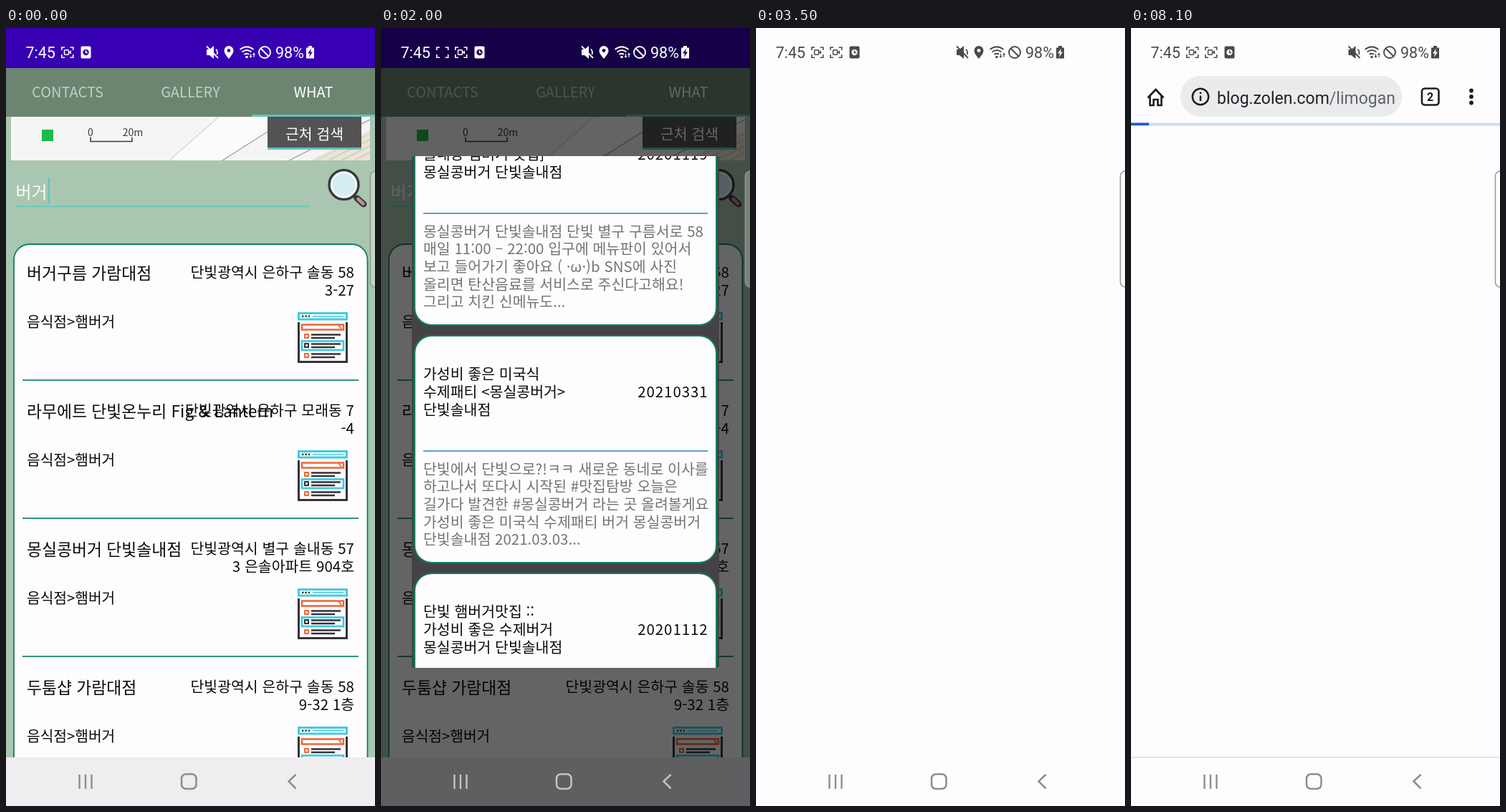
Write an HTML page that moves like this. It is 515x1087 px and loops after 8.6 s.

```html
<!DOCTYPE html>
<html lang="ko">
<head>
<meta charset="utf-8">
<title>Burger search</title>
<style>
  html, body { margin: 0; width: 100%; height: 100%; overflow: hidden; background: #fefcfe; }
  svg { display: block; width: 100vw; height: 100vh; }
  text { font-family: "Noto Sans CJK KR", "Noto Sans CJK", "Noto Sans", sans-serif; }
  .sys { font-family: Roboto, "Noto Sans", sans-serif; }
  .bold { font-weight: 700; }
  .end { text-anchor: end; }
  .mid { text-anchor: middle; }
  .date { text-anchor: end; letter-spacing: .9px; }
</style>
</head>
<body>
<svg id="stage" viewBox="0 0 515 1087" preserveAspectRatio="none"></svg>
<script>
const LOOP = 8600, STEP = 100;
const PAPER = '#fefcfe', GREEN = '#11805f', TEAL = '#62c4bc';

// y is the vertical middle of the line
const text = (x, y, str, size, fill = '#0c0a0c', cls = '') =>
  `<text x="${x}" y="${(y + size * .37).toFixed(2)}" font-size="${size}" fill="${fill}" class="${cls}">${str}</text>`;
const rect = (x, y, w, h, fill, more = '') =>
  `<rect x="${x}" y="${y}" width="${w}" height="${h}" fill="${fill}" ${more}/>`;
const line = (d, stroke, width = 2, more = '') =>
  `<path d="${d}" fill="none" stroke="${stroke}" stroke-width="${width}" ${more}/>`;
const group = (id, body, more = '') => `<g id="${id}" ${more}>${body}</g>`;

const SHOP = '몽실콩버거', BRANCH = '단빛솔내점';

const shops = [
  ['버거구름 가람대점', '단빛광역시 은하구 솔동 58', '3-27'],
  ['라무에트 단빛온누리 Fig &amp; Lantern', '단빛광역시 은하구 모래동 7', '-4'],
  [`${SHOP} ${BRANCH}`, '단빛광역시 별구 솔내동 57', '3 은솔아파트 904호'],
  ['두툼샵 가람대점', '단빛광역시 은하구 솔동 58', '9-32 1층']
];

const posts = [
  {
    title: ['[단빛 나들이 /', '솔내동 햄버거 맛집]', `${SHOP} ${BRANCH}`],
    date: '20201119',
    body: [`${SHOP} ${BRANCH} 단빛 별구 구름서로 58`, '매일 11:00 – 22:00 입구에 메뉴판이 있어서',
      '보고 들어가기 좋아요 ( ·ω·)b SNS에 사진', '올리면 탄산음료를 서비스로 주신다고해요!', '그리고 치킨 신메뉴도...']
  },
  {
    title: ['가성비 좋은 미국식', `수제패티 &lt;${SHOP}&gt;`, BRANCH],
    date: '20210331',
    body: ['단빛에서 단빛으로?!ㅋㅋ 새로운 동네로 이사를', '하고나서 또다시 시작된 #맛집탐방 오늘은',
      `길가다 발견한 #${SHOP} 라는 곳 올려볼게요`, `가성비 좋은 미국식 수제패티 버거 ${SHOP}`, `${BRANCH} 2021.03.03...`]
  },
  {
    title: ['단빛 햄버거맛집 ::', '가성비 좋은 수제버거', `${SHOP} ${BRANCH}`],
    date: '20201112',
    body: []
  }
];

function pageIcon(x, y) {
  const dark = '#353338', cyan = '#43cbe0', orange = '#ee6a3c';
  const strip = (top, bullet) => rect(10, top, 5, 5, 'none', `stroke="${bullet}" stroke-width="2"`) +
    line(`M19 ${top + .5}H60M19 ${top + 5}H52`, dark, 2.4);
  return `<g transform="translate(${x} ${y})">` +
    line('M1.5 14V69.5H68.5V14', dark, 3) +
    rect(1.5, 1.5, 67, 8.5, PAPER, `stroke="${cyan}" stroke-width="3"`) +
    line('M6 5.8H17', dark, 2.4, 'stroke-dasharray="2.4 2"') + line('M21 5.8H64', cyan, 1.6) +
    rect(6, 17.5, 58, 7, 'none', `stroke="${orange}" stroke-width="2.6"`) + line('M57 18L61 23', orange, 2) +
    strip(31, orange) +
    rect(6, 40.5, 58, 12.5, 'none', `stroke="${cyan}" stroke-width="2.8"`) + strip(44, dark) +
    strip(58, orange) + '</g>';
}

function shopRow([name, addr, rest], i) {
  const y = i * 193;
  return text(29, 343 + y, name, 22.8) +
    text(486, 341 + y, addr, 20.5, '#0c0a0c', 'end') + text(486, 366 + y, rest, 20.5, '#0c0a0c', 'end') +
    text(29, 410 + y, '음식점&gt;햄버거', 20.3) + pageIcon(407, 397 + y) +
    line(`M23 ${492 + y}H492`, '#2f9478', 1.8);
}

function postCard({ title, date, body }, i) {
  return `<g transform="translate(0 ${181 + i * 332})">` +
    rect(47, 1, 421, 317, PAPER, `rx="24" stroke="${GREEN}" stroke-width="2"`) +
    title.map((s, k) => text(59, 54.5 + k * 24.8, s, 20.5)).join('') +
    text(456.5, 79.5, date, 20.5, '#0c0a0c', 'date') +
    line('M59 162H456', '#5b9fc8', 1.8) +
    body.map((s, k) => text(59, 187 + k * 24.7, s, 20.5, '#757375')).join('') + '</g>';
}

const mapPanel = `<g clip-path="url(#mapBox)">` +
  rect(7, 124, 501, 61, '#f6f5f6') +
  '<path d="M228 185L297 124H400L308 180L300 185Z" fill="#fcfbfc"/>' +
  '<path d="M425 185L508 143V185Z" fill="#e9e5d6"/>' +
  line('M228 185L297 124M432 185L508 147', '#d2d0d0', 1.2) +
  line('M302 185L398 124M395 185L508 128', '#9c9a9c', 1.2) +
  line('M450 185L508 156M468 185L508 165M486 185L508 174', '#cfc9b4', 1.4) + '</g>' +
  rect(50, 142, 16, 16, '#1fb84a') +
  text(118, 146, '0', 14, '#3a383a', 'mid') + text(177, 146, '20m', 14, '#3a383a', 'mid') +
  line('M118 152.5V158.5H176V152.5', '#3a383a', 1.6) +
  rect(365, 124, 131, 46, '#555256') + rect(365, 167, 131, 3, TEAL) +
  text(430.5, 148, '근처 검색', 20.5, '#fff', 'mid');

const magnifier = line('M485 234L491 239', '#3a393d', 5) +
  line('M490 238L499 246', '#3a393d', 9, 'stroke-linecap="round"') +
  line('M491.5 239L498.5 245.5', '#c98f8a', 4.5, 'stroke-linecap="round"') +
  '<circle cx="471.5" cy="219" r="20.5" fill="#d3edf3" stroke="#3a393d" stroke-width="3.4"/>' +
  '<circle cx="471.5" cy="219" r="17" fill="none" stroke="#f4fbfc" stroke-width="2.5"/>';

const app = rect(0, 0, 515, 1087, '#a9c6b0') +
  mapPanel + text(13.5, 229, '버거', 24, '#f8fbf8') +
  rect(13, 248, 411, 2.4, '#6fcac2') + rect(58.5, 210, 2.6, 35, TEAL, 'id="caret"') + magnifier +
  rect(11, 302, 493.5, 800, PAPER, `rx="22" stroke="${GREEN}" stroke-width="1.8"`) +
  shops.map(shopRow).join('') +
  rect(0, 0, 515, 56, '#3700b3') + rect(0, 56, 515, 68, '#6b8570') +
  text(86, 90, 'CONTACTS', 20, '#c3cec5', 'mid') + text(257.5, 90, 'GALLERY', 20, '#c3cec5', 'mid') +
  text(429, 90, 'WHAT', 20, '#fff', 'mid') + rect(343, 121, 172, 3, TEAL) +
  rect(0, 1019, 515, 68, '#efedf0') +
  rect(0, 0, 515, 1087, '#000', 'id="dim"') +
  group('dialog', rect(43, 179, 429, 715, '#454246', 'rx="3"') +
    `<g clip-path="url(#dialogBox)">${group('posts', posts.map(postCard).join(''))}</g>`);

const browser = rect(69, 67, 309, 57, '#e9ebec', 'rx="28.5"') +
  line('M23.5 97.5L34.5 86L45.5 97.5M26.5 95V108H31.5V100H37.5V108H42.5V95', '#1d1c1e', 2.6) +
  '<circle cx="97" cy="96" r="11.2" fill="none" stroke="#1d1c1e" stroke-width="2.5"/>' +
  line('M97 94.5V102M97 89.5V92', '#1d1c1e', 2.5) +
  rect(406, 84.5, 23.5, 23, 'none', 'rx="4" stroke="#1d1c1e" stroke-width="2.6"') +
  text(417.7, 96, '2', 16, '#1d1c1e', 'sys mid bold') +
  [87.5, 96, 104.5].map(y => `<circle cx="475" cy="${y}" r="2.9" fill="#1d1c1e"/>`).join('') +
  line('M0 1019H515', '#dedcdf', 1.6) +
  group('load', text(120, 97, 'blog.zolen.com<tspan fill="#606266">/limogan</tspan>', 23, '#202124', 'sys') +
    rect(0, 132.5, 515, 4.2, '#d1e0f0') + rect(0, 132.5, 25, 3.6, '#1c5cc6', 'id="bar"'));

const INK = 'currentColor';
const brackets = line('M77.8 31V27H82M89.5 27H93.7V31M93.7 37V41.2H89.5M82 41.2H77.8V37', INK, 1.6);
const camera = rect(81.5, 30.8, 6, 6.4, 'none', `rx="1" stroke="${INK}" stroke-width="1.5"`) +
  `<path d="M88 33.5L91 31.5V36.5L88 34.5Z" fill="${INK}"/>`;
const clock = rect(104.5, 25.5, 14, 17, INK, 'rx="2"') +
  '<circle class="hole" cx="111.5" cy="34" r="4.2"/>' + line('M111.5 31V34.5H114', INK, 1.4);
const mute = `<path d="M280 30H284L290 25V43L284 38H280Z" fill="${INK}"/>` +
  line('M280 25.5L296 42M293 29.5Q296 33 294.5 37', INK, 1.8);

const status = text(27.5, 34, '7:45', 21.5, INK, 'sys') +
  group('fresh', brackets + group('freshCam', camera)) +
  group('older', brackets + camera + clock) +
  group('mute', mute) +
  group('pin', `<path d="M311 43C306 37 304.5 34 304.5 31.5A6.5 6.5 0 0 1 317.5 31.5C317.5 34 316 37 311 43Z" fill="${INK}"/>` +
    '<circle class="hole" cx="311" cy="31.5" r="2.4"/>') +
  line('M326.5 30Q336 22.5 345.5 30M329.5 33.5Q336 28.5 342.5 33.5M332.5 37Q336 34.5 339 37', INK, 1.8) +
  `<circle cx="336" cy="40.5" r="1.8" fill="${INK}"/>` +
  line('M341.5 36V41M346 41V35.5M340 39L341.5 41L343 39M344.5 37.5L346 35.5L347.5 37.5', INK, 1.1) +
  `<circle cx="361" cy="34" r="8" fill="none" stroke="${INK}" stroke-width="1.9"/>` +
  line('M355.5 28.5L366.5 39.5', INK, 1.9) +
  text(376, 34, '98%', 21.5, INK, 'sys') +
  `<path d="M419 27.5H422V25H427V27.5H430V42.5H419Z" fill="${INK}"/>` +
  '<path class="hole" d="M426 28.5L421 35.5H424L423 41L428 33.5H425Z"/>';

const navIcons = line('M102.5 1043V1063M111 1043V1063M119.5 1043V1063', INK, 2.4) +
  rect(245, 1042.5, 20.5, 20.5, 'none', `rx="6" stroke="${INK}" stroke-width="2.5"`) +
  line('M404.5 1043L394.5 1052.5L404.5 1062.5', INK, 2.5);

const stage = document.getElementById('stage');
stage.innerHTML = `<defs>
    <clipPath id="mapBox">${rect(7, 124, 501, 61, '#000')}</clipPath>
    <clipPath id="dialogBox">${rect(43, 179, 429, 715, '#000', 'rx="3"')}</clipPath>
  </defs>` + rect(0, 0, 515, 1087, '#000') + group('app', app) +
  rect(0, 0, 515, 1087, PAPER, 'id="sheet"') + group('browser', browser) +
  rect(508.5, 200, 20, 162, '#fff', 'id="edge" rx="7" stroke="#929892" stroke-width="1.5"') +
  group('nav', navIcons) + group('status', status);

const el = {};
stage.querySelectorAll('[id]').forEach(n => { el[n.id] = n; });
const holes = stage.querySelectorAll('.hole');

const clamp = v => Math.max(0, Math.min(1, v));
const show = (node, on) => node.setAttribute('visibility', on ? 'inherit' : 'hidden');
const fade = (node, v) => node.setAttribute('opacity', v);
const move = (node, x, y) => node.setAttribute('transform', `translate(${x} ${y})`);

// piecewise linear track of [time, value] points
function track(points, t) {
  const i = points.findIndex(p => p[0] > t);
  if (i < 0) return points[points.length - 1][1];
  if (i === 0) return points[0][1];
  const [t0, a] = points[i - 1], [t1, b] = points[i];
  return a + (b - a) * (t - t0) / (t1 - t0);
}

const SCROLL = [[1300, 0], [1400, 10], [1600, 56], [1800, 80], [1900, 80], [2000, 84], [2200, 122], [2400, 146], [2600, 151]];
const LIFT = [[2900, 0], [3000, 1], [3200, 8], [3400, 15], [3700, 20]];
const PUSH = [[0, 0], [100, 9], [200, 20], [300, 26]];

function render(t) {
  const web = t >= 3600, light = t < 3400;

  show(el.caret, t < 500);
  fade(el.dim, .6 * clamp((t - 700) / 450));
  fade(el.dialog, track([[800, 0], [900, .6], [1000, .95], [1100, 1]], t));
  show(el.posts, t >= 1100);
  move(el.posts, 0, -track(SCROLL, t));

  // the browser sheet rises while the app slides up a little
  show(el.app, t < 3700);
  move(el.app, 0, -track(LIFT, t));
  const top = t < 3000 ? 1087 : 1087 * Math.pow(1 - clamp((t - 2900) / 600), 2.85);
  el.sheet.setAttribute('y', top);
  fade(el.sheet, clamp((t - 2950) / 330));
  show(el.browser, web);
  show(el.load, web && t >= 4100);
  el.bar.setAttribute('width', track([[4000, 0], [4300, 25]], t));
  el.edge.setAttribute('fill-opacity', web ? 1 : .28);

  const push = track(PUSH, t);
  move(el.older, push, 0);
  fade(el.fresh, push / 26);
  // the recording mark toggles twice a second
  show(el.freshCam, Math.floor((t + 400) / 500) % 2 === 1);
  move(el.mute, web ? 23.5 : 0, 0);
  show(el.pin, !web);
  el.status.setAttribute('color', light ? '#fff' : '#4b494c');
  const hole = t < 800 ? '#3700b3' : light ? '#1a0058' : PAPER;
  holes.forEach(n => n.setAttribute('fill', hole));
  el.nav.setAttribute('color', t < 900 || t >= 3400 ? '#8e8c8f' : t < 3100 ? '#c6c4c7' : '#f3f1f3');
}

const start = performance.now();
function tick(now) {
  const t = Math.max(0, now - start) % LOOP;
  render(Math.floor(t / STEP) * STEP);
  requestAnimationFrame(tick);
}
render(0);
requestAnimationFrame(tick);
</script>
</body>
</html>
```
